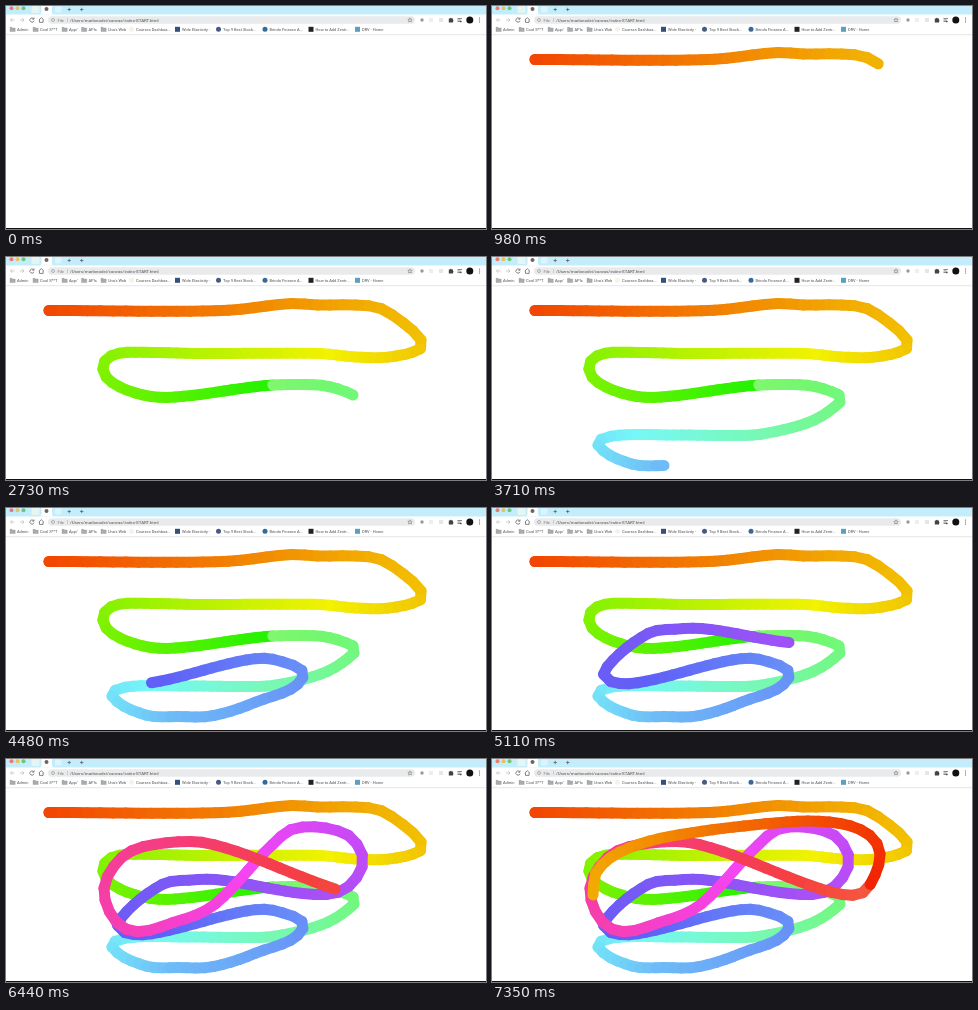
An HTML page with a canvas that plays this animation: 480x223 px, repeating every 7420 ms.

```html
<!DOCTYPE html>
<html lang="en">
<head>
<meta charset="utf-8">
<title>Rainbow brush</title>
<style>
  html, body { margin: 0; width: 100%; height: 100%; overflow: hidden; background: #fff; }
  svg, canvas { position: absolute; left: 0; top: 0; width: 480px; height: 223px; }
  text { font: 4.2px Roboto, Arial, sans-serif; fill: #505050; }
</style>
</head>
<body>
<svg viewBox="0 0 480 223">
  <rect width="480" height="8.5" fill="#c4edfc"/>
  <circle cx="5.5" cy="2.3" r="2" fill="#ea7a74"/>
  <circle cx="11.5" cy="2.3" r="2" fill="#e6c163"/>
  <circle cx="17.5" cy="2.3" r="2" fill="#6cc57a"/>
  <rect x="25.5" width="8" height="7" rx="1" fill="#e6f5ef"/>
  <path d="M34 8.5Q35.5 8 35.5 6V0H46V6Q46 8 47.5 8.5Z" fill="#fff"/>
  <circle cx="40.5" cy="3" r="2" fill="#6b6463"/>
  <rect x="49" y=".5" width="6.5" height="6" rx="1" fill="#dcf4fb"/>
  <g fill="none" stroke="#555" stroke-width=".7">
    <path d="M61.5 3.500h3.400m-1.700-1.700v3.400M74 3.500h3.400m-1.700-1.700v3.400"/>
    <path d="M8.500 14h-4l1.800-1.800M4.500 14l1.800 1.800M14 14h4l-1.800-1.800M18 14l-1.800 1.800" stroke="#bbb"/>
    <path d="M27.600 12.700a2.100 2.100 0 1 0 .4 2M28 11.500v1.700h-1.700"/>
    <path d="M32.800 14l2.500-2.300 2.500 2.300M33.500 13.700v2.700h3.600v-2.700"/>
  </g>
  <rect x="42" y="10.300" width="367" height="7.400" rx="3.700" fill="#e9eaeb"/>
  <circle cx="47" cy="14" r="1.500" fill="none" stroke="#777" stroke-width=".5"/>
  <text x="51.500" y="15.500" style="fill:#777">File</text>
  <path d="M61.500 12v4" stroke="#aaa" stroke-width=".5"/>
  <text x="64" y="15.500" style="font-size:4.400px">/Users/marlonodei/canvas/index-START.html</text>
  <path d="M404 11.800l.6 1.500 1.600.1-1.200 1 .4 1.600-1.400-.9-1.400.9.4-1.600-1.200-1 1.600-.1z" fill="none" stroke="#666" stroke-width=".5"/>
  <circle cx="416" cy="14" r="1.700" fill="#999"/>
  <rect x="423" y="12" width="4" height="4" fill="#eee"/>
  <rect x="433" y="12" width="4" height="4" fill="#e6e6e6"/>
  <path d="M442.800 12.600h1.300a.8.8 0 0 1 1.600 0h1.300v1.300a.8.8 0 0 1 0 1.500v1h-4.200z" fill="#444"/>
  <path d="M451.500 12.500h4.500M451.500 14h3M451.500 15.500h2.500" stroke="#555" stroke-width=".7"/>
  <circle cx="454.800" cy="15.400" r=".9" fill="#555"/>
  <circle cx="463.800" cy="14" r="3.500" fill="#111"/>
  <path d="M473.500 12h0m0 2h0m0 2h0" stroke="#555" stroke-width="1.200" stroke-linecap="round"/>
  <g id="bookmarks"></g>
  <path d="M0 28.700H480" stroke="#dcdcdc" stroke-width=".7"/>
  <rect y="222" width="480" height="1" fill="#111"/>
</svg>
<canvas id="trail" width="480" height="223"></canvas>
<script>
const folder = x => `<path d="M${x} 21.300h2l.6.700h2.600v3.500h-5.200z" fill="#a9abad" stroke="#85878a" stroke-width=".3"/>`;
const dot = color => x => `<circle cx="${x + 2.5}" cy="23.300" r="2.500" fill="${color}"/>`;
const square = color => x => `<rect x="${x}" y="20.800" width="5" height="5" fill="${color}"/>`;

const bookmarks = [
  [4, 'Admin', folder], [27, 'Cool S**T', folder], [56, 'App/', folder],
  [75.5, 'APIs', folder], [95, "Una's Web", folder],
  [123, 'Courses Dashboa...', dot('#f3f3e8')],
  [169, 'Wide Elasticity -', square('#34507c')],
  [210, 'Top 9 Best Stock...', dot('#465b80')],
  [256.5, 'Brindo Finance A...', dot('#356a9b')],
  [302.5, 'How to Add Zentr...', square('#222')],
  [349, 'DRV - Home', square('#5d9fc0')]
];
document.getElementById('bookmarks').innerHTML = bookmarks.map(([x, label, icon]) =>
  `${icon(x)}<text x="${x + 7}" y="24.800" style="font-size:4px">${label}</text>`).join('');

// Each sweep: the step and hue it ends on, and the key points of its curve
const sweeps = [
  { step: 10, hue: 47, via: '43,53.5 218,53.5 285,46.5 313,48 350,48 376,52 411,77 415,83' },
  { step: 21, hue: 80, via: '414,92 383,100 350,100 313,96.5 190,96.5 146,95.5' },
  { step: 34, hue: 122, via: '110,97 97,108 104,124 137,138 170,140 255,129 290,127.5 320,129 347,138' },
  { step: 48, hue: 206, via: '349,144 320,164 270,177 240,178.5 185,178 120,179 106,188 140,207 172,208.5' },
  { step: 68, hue: 268, via: '205,208 250,194 297,169 270,152 240,152 150,174 120,174 112,163 155,126 185,121 215,121 297,134.5' },
  { step: 87, hue: 362, via: '333,133 353,115 356,95 338,74 290,69 264,88 208,146 172,162 122,171 98,135 114,100 145,86 205,85 329,130' },
  { step: 100, hue: 402, via: '365,136 379,124 388,94 376,75 345,64 295,63 180,77 130,92 105,112 101,136' }
];

const lerp = (a, b, u) => a + (b - a) * u;
const dist = (a, b) => Math.hypot(b.x - a.x, b.y - a.y);

// Within a sweep the brush keeps an even speed and the hue turns evenly
const points = [];
let from = { step: 0, hue: 16 };
for (const sweep of sweeps) {
  const added = sweep.via.split(' ').map(pair => {
    const [x, y] = pair.split(',').map(Number);
    return { x, y };
  });
  let length = 0, last = points.at(-1) || added[0];
  for (const p of added) {
    p.along = length += dist(last, p);
    last = p;
  }
  for (const p of added) {
    p.step = lerp(from.step, sweep.step, p.along / length);
    p.hue = lerp(from.hue, sweep.hue, p.along / length);
  }
  points.push(...added);
  from = sweep;
}
points.forEach((p, i) => {
  const a = points[Math.max(0, i - 1)], b = points[Math.min(points.length - 1, i + 1)], d = dist(a, b);
  p.dx = (b.x - a.x) / d;
  p.dy = (b.y - a.y) / d;
});

// Smooth cubic through the key points
function brushAt(step) {
  const i = Math.max(1, points.findIndex(p => p.step >= step - 1e-6));
  const a = points[i - 1], b = points[i], handle = dist(a, b) / 3;
  const u = (step - a.step) / (b.step - a.step), v = 1 - u;
  const cubic = (c, d) => v ** 3 * a[c] + 3 * v * v * u * (a[c] + a[d] * handle)
    + 3 * v * u * u * (b[c] - b[d] * handle) + u ** 3 * b[c];
  return { x: cubic('x', 'dx'), y: cubic('y', 'dy'), hue: lerp(a.hue, b.hue, u) };
}

// Cool hues are paler than warm ones
function paint(hue) {
  const cool = hue > 112 && hue < 368;
  const light = cool ? 66 + 6 * Math.cos((hue - 160) * Math.PI / 180) : 48;
  return `hsl(${hue}, ${cool ? 90 : 98}%, ${light}%)`;
}

const LOOP = 7420, DELAY = 350, STEP = 70, PARTS = 3;
const ctx = document.getElementById('trail').getContext('2d');
ctx.lineWidth = 11;
ctx.lineCap = 'round';

function draw(step) {
  ctx.clearRect(0, 0, 480, 223);
  let last = brushAt(0);
  for (let n = 0; n <= step * PARTS; n++) {
    const tip = brushAt(n / PARTS);
    ctx.strokeStyle = paint(tip.hue);
    ctx.beginPath();
    ctx.moveTo(last.x, last.y);
    ctx.lineTo(tip.x + 0.01, tip.y);
    ctx.stroke();
    last = tip;
  }
}

const start = performance.now();
let shown = -1;
function tick() {
  const time = (performance.now() - start) % LOOP;
  const step = Math.max(-1, Math.floor((time - DELAY) / STEP));
  if (step !== shown) draw(shown = step);
  requestAnimationFrame(tick);
}
tick();
</script>
</body>
</html>
```
